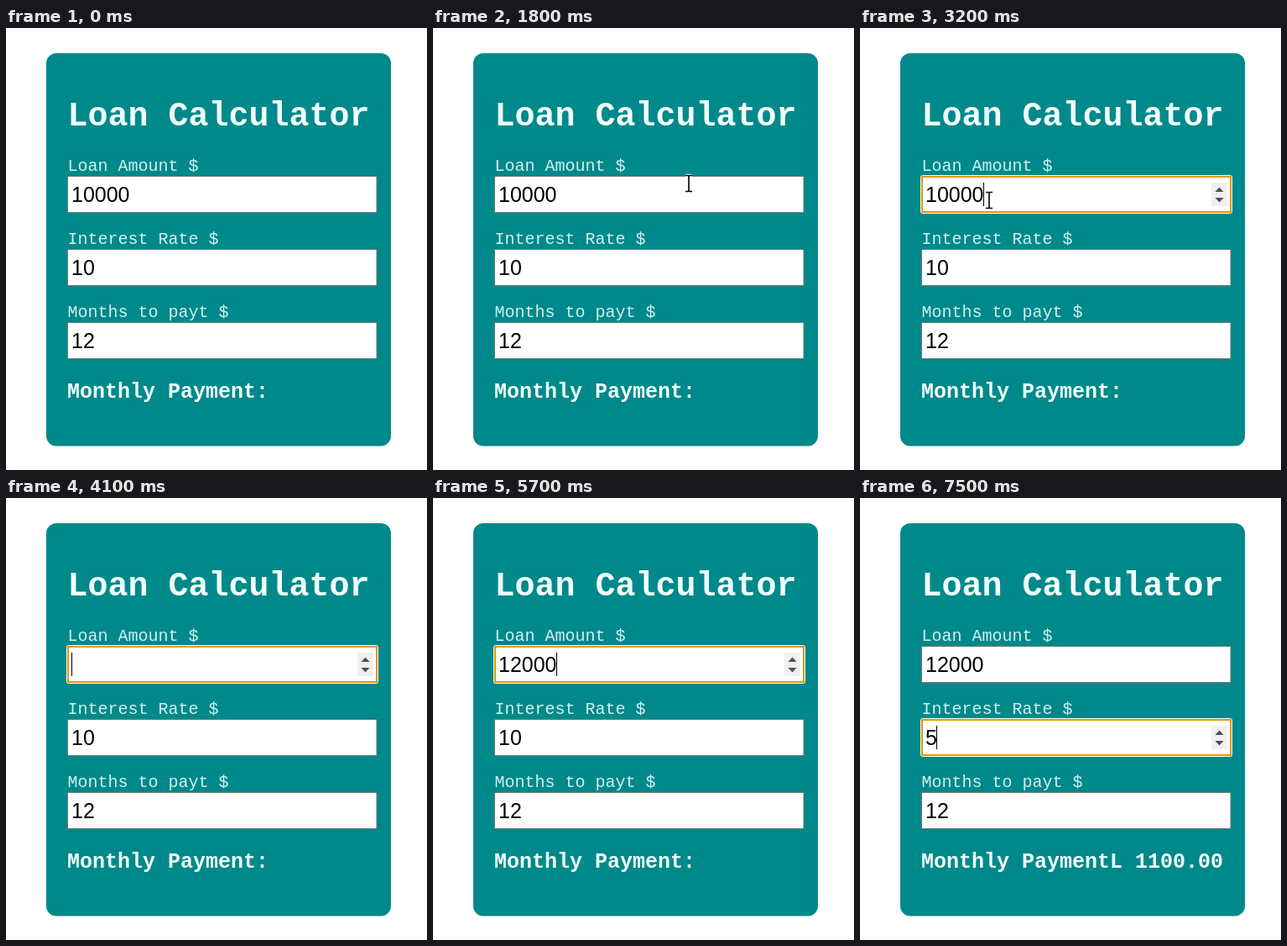
An HTML page for the animation above (8000 ms loop, 502 px wide and 526 px high).

```html
<!DOCTYPE html>
<html lang="en">
<head>
<meta charset="utf-8">
<title>Loan Calculator</title>
<style>
  html, body { margin: 0; height: 100%; overflow: hidden; background: #fff; }
  svg { display: block; }
  text { font-family: "Courier New", "Liberation Mono", monospace; fill: azure; white-space: pre; }
  .title { font-size: 40px; font-weight: bold; }
  .label { font-size: 20px; fill-opacity: .88; }
  .result { font-size: 25px; font-weight: bold; }
  .value { font-family: Arial, "Liberation Sans", sans-serif; font-size: 25px; fill: #000; }
  .selected { fill: #fff; }
</style>
</head>
<body>
<svg width="502" height="526" viewBox="0 0 502 526">
  <defs>
    <path id="beamShape" d="M-4-9.500h3l1 1 1-1h3M0-8.500v17M-4 9.500h3l1-1 1 1h3" fill="none"/>
  </defs>
  <rect x="48" y="30" width="411" height="467.500" rx="12" fill="#00898a"/>
  <text class="title" x="73.500" y="116">Loan Calculator</text>
  <g id="fields"></g>
  <text class="result" id="result" x="73" y="440"></text>
  <g id="focus">
    <rect x="72.500" y="175.500" width="371" height="45" rx="2" fill="none" stroke="#fff"/>
    <rect x="74" y="177" width="368" height="42" rx="1" fill="none" stroke="#e59700" stroke-width="2"/>
    <path d="M419 184h19v28h-19z" fill="#f0f0f0"/>
    <path d="M423.500 195h10l-5-5.500zM423.500 202h10l-5 5.500z" fill="#505050"/>
    <rect id="caret" y="184" width="1" height="28"/>
  </g>
  <g id="pointer">
    <g id="beam">
      <use href="#beamShape" stroke="#fff" stroke-width="3.500"/>
      <use href="#beamShape" stroke="#000" stroke-width="1.600"/>
    </g>
    <path id="arrow" d="M.5.500v16l3.700-3.600 2.600 6 2.500-1.100-2.600-5.800h5.200z" fill="#fff" stroke="#000"/>
  </g>
</svg>
<script>
const LOOP = 8000, TICK = 100, ROW = 87, TEXT_X = 78, DIGIT = 13.9;
const $ = id => document.getElementById(id);

$("fields").innerHTML = ["Loan Amount $", "Interest Rate $", "Months to payt $"].map((label, i) => `
  <g transform="translate(0 ${i * ROW})">
    <text class="label" x="73.500" y="170">${label}</text>
    <rect x="73.500" y="176.500" width="368.500" height="43" fill="#fff" stroke="#6a7a78"/>
    <rect class="highlight" y="184" height="28" fill="#0078d7"/>
    <text class="value" x="${TEXT_X}" y="207"><tspan></tspan><tspan class="selected"></tspan></text>
  </g>`).join("");
const fields = [...$("fields").children];

// time, amount, rate, focused field, first selected digit (or "drag")
const states = [
  [0, "10000", "10", -1],
  [2100, "10000", "10", 0],
  [3100, "10000", "10", 0, "drag"],
  [4100, "", "10", 0],
  [4200, "1", "10", 0],
  [4400, "12", "10", 0],
  [5200, "120", "10", 0],
  [5400, "1200", "10", 0],
  [5600, "12000", "10", 0],
  [6000, "12000", "10", 1, 0],
  [7200, "12000", "", 1],
  [7500, "12000", "5", 1],
];

// time, x, y of the pointer
const route = [
  [0, 520, 140], [900, 520, 140], [1000, 499, 140], [1100, 520, 140], [1300, 520, 160],
  [1400, 490, 163], [1700, 340, 182], [2000, 236, 190], [2200, 230, 189],
  [2500, 130, 180], [2800, 22, 221], [3100, 154, 205], [3200, 154, 205],
  [3400, 9, 204], [3500, -20, 204], [LOOP, -20, 204],
];

function pointerAt(t) {
  const i = route.findIndex(p => p[0] > t);
  const [t0, x0, y0] = route[i - 1], [t1, x1, y1] = route[i];
  const k = (t - t0) / (t1 - t0);
  return [Math.round(x0 + (x1 - x0) * k), Math.round(y0 + (y1 - y0) * k)];
}

const show = (el, on) => el.setAttribute("visibility", on ? "visible" : "hidden");

function draw(t) {
  const [start, amount, rate, focus, selection] = states.findLast(s => s[0] <= t);
  const [x, y] = pointerAt(t);
  const values = [amount, rate, "12"];

  fields.forEach((field, i) => {
    const value = values[i], n = value.length;
    let from = n;
    if (i === focus && selection === "drag") from = Math.max(0, Math.min(n, Math.round((x - TEXT_X) / DIGIT)));
    else if (i === focus && selection !== undefined) from = selection;
    const [plain, selected] = field.querySelectorAll("tspan");
    plain.textContent = value.slice(0, from);
    selected.textContent = value.slice(from);
    const highlight = field.querySelector(".highlight");
    highlight.setAttribute("x", TEXT_X + from * DIGIT);
    highlight.setAttribute("width", (n - from) * DIGIT);
    if (i === focus) {
      $("focus").setAttribute("transform", `translate(0 ${i * ROW})`);
      $("caret").setAttribute("x", Math.floor(TEXT_X + n * DIGIT));
      show($("caret"), from === n && Math.floor((t - start) / 500) % 2 === 0);
    }
  });
  $("focus").setAttribute("display", focus < 0 ? "none" : "inline");
  $("result").textContent = t < 6000 ? "Monthly Payment:" : "Monthly PaymentL 1100.00";

  const overInput = x > 73 && x < 443 && y > 176 && y < 220;
  const beam = overInput || selection === "drag";
  $("pointer").setAttribute("transform", `translate(${x} ${y})`);
  show($("beam"), beam);
  show($("arrow"), !beam);
}

function frame() {
  const t = performance.now() % LOOP;
  draw(Math.floor(t / TICK) * TICK);
  requestAnimationFrame(frame);
}
frame();
</script>
</body>
</html>
```
